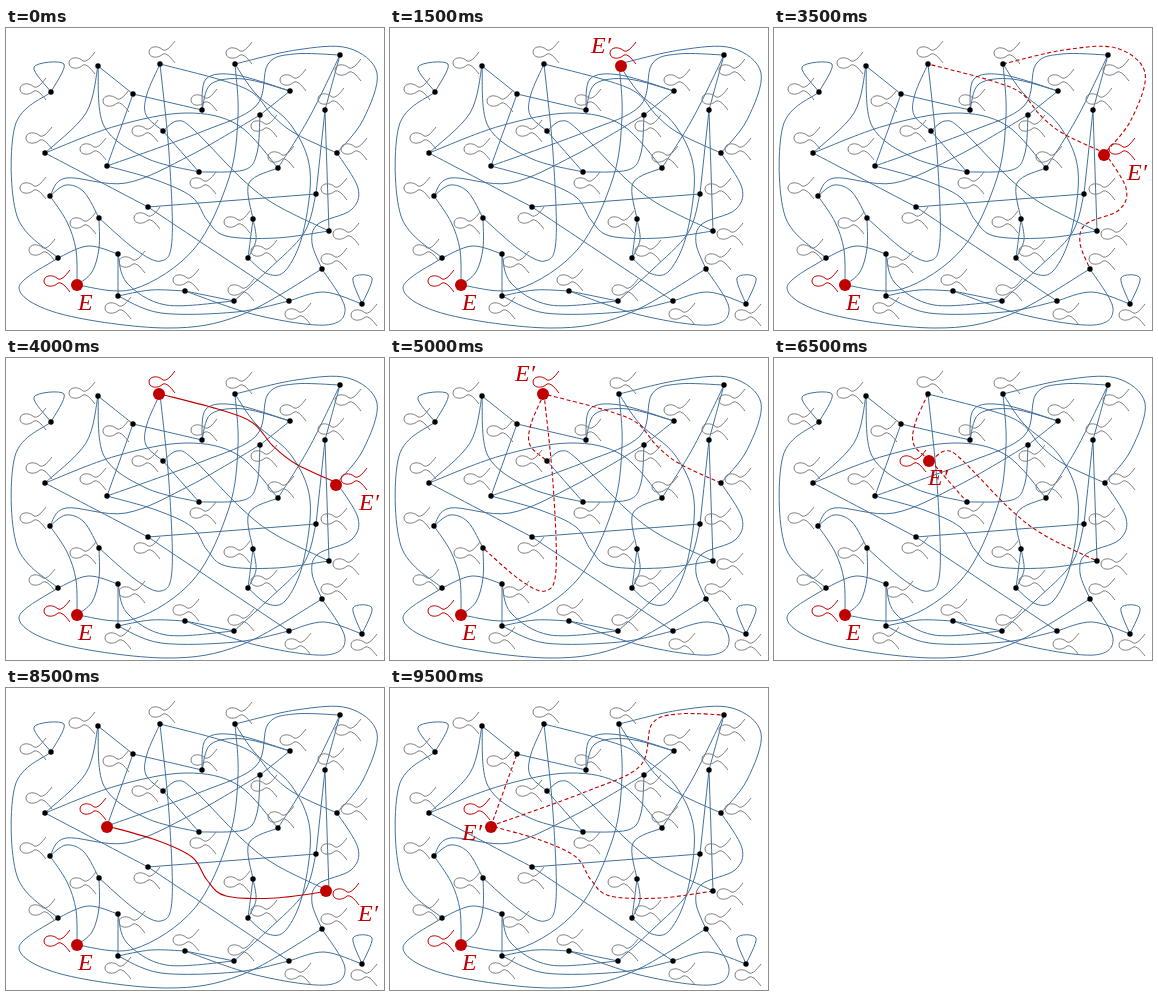
These frames come from a looping animation (378x302 px, 10 s). An HTML page with a canvas:

```html
<!DOCTYPE html>
<html lang="en">
<head>
<meta charset="utf-8">
<title>Random walk on a graph of curves</title>
<style>
html, body { margin: 0; width: 100%; height: 100%; overflow: hidden; background: #fff; }
canvas { display: block; width: 378px; height: 302px; }
</style>
</head>
<body>
<canvas id="stage" width="378" height="302"></canvas>
<script>
const ctx = document.getElementById('stage').getContext('2d');
const RED = '#c00000', BLUE = '#41719c', GRAY = '#7f7f7f';
const STEP = 500, STEPS = 20;

// Vertex: x, y, then the centre of its small curve symbol.
const nodes = {
  A: [45, 64, 27, 61], B: [92, 38, 76, 35], C: [127, 66, 110, 73], D: [154, 36, 156, 24],
  F: [196, 82, 198, 72], G: [229, 36, 233, 25], H: [284, 63, 287, 52], I: [334, 27, 342, 42],
  J: [39, 125, 33, 110], K: [101, 138, 87, 121], L: [157, 103, 139, 103], M: [193, 144, 197, 155],
  N: [254, 87, 258, 98], O: [319, 82, 325, 71], P: [272, 140, 275, 129], Q: [331, 125, 348, 121],
  R: [310, 166, 328, 161], S: [142, 179, 141, 190], T: [44, 168, 27, 160], U: [93, 190, 77, 195],
  V: [247, 191, 231, 194], W: [323, 203, 340, 206], X: [242, 230, 258, 223], Y: [52, 230, 36, 222],
  Z: [112, 226, 126, 234], E: [71, 257, 51, 253], a: [112, 268, 112, 280], b: [179, 263, 180, 252],
  c: [228, 273, 235, 262], d: [283, 273, 292, 286], e: [316, 241, 328, 231], f: [356, 276, 358, 287]
};

// Edges met by the walk, with the points they pass through.
const walkEdges = {
  ET: [70, 222, 61, 194], EU: [86, 244, 93, 220],
  EG: [128, 261, 188, 221, 223, 150, 232, 88],
  GQ: [290, 22, 342, 20, 371, 45, 357, 92],
  GX: [250, 66, 285, 97, 304, 142, 297, 205, 280, 242, 262, 246],
  QD: [290, 106, 267, 88, 247, 65, 215, 52],
  Qe: [352, 160, 345, 182, 312, 196, 306, 215],
  DL: [141, 66, 140, 87], DU: [163, 125, 166, 212, 155, 233, 130, 222],
  LM: [], LW: [171, 93, 187, 101, 236, 151, 270, 177], WO: [],
  WK: [270, 210, 220, 208, 201, 192, 186, 169, 150, 152],
  KC: [], KI: [195, 104, 250, 78, 262, 36, 288, 26]
};

const otherEdges = {
  AY: [9, 98, 11, 188], AA: [28, 39, 58, 36], BC: [], BJ: [80, 85], BM: [98, 98, 140, 130],
  CF: [], FH: [200, 51, 230, 47], HF: [238, 51, 205, 56], HN: [], JS: [],
  JP: [110, 98, 180, 85, 232, 97], MN: [238, 142, 251, 125],
  NT: [185, 127, 120, 155, 60, 150], IP: [303, 90], IO: [], OR: [],
  PV: [243, 155], VX: [], XV: [250, 212], RS: [], Rc: [298, 205, 262, 242],
  Sd: [], TU: [60, 157, 78, 164], YZ: [82, 218], Za: [],
  Ye: [13, 260, 55, 286, 160, 300, 235, 287],
  Zc: [121, 255, 160, 277], ab: [145, 262], ad: [155, 285, 230, 284],
  bc: [], be: [250, 287, 320, 297, 339, 280], df: [318, 264], ff: [347, 250, 366, 250]
};

const walk = [...'EGQDLWK'];
const labels = {
  G: [201, 25], Q: [353, 152], D: [125, 23], L: [154, 127], W: [352, 233], K: [72, 152]
};
// Large dots sit slightly off some vertices.
const nudge = { G: [2, 2], Q: [-1, 2], D: [-1, 0], L: [-2, 0], W: [-3, 0], K: [0, 1] };

const symbol = new Path2D('M13-11Q5 0 1-2C-4-7-13-6-13 0C-13 6-4 7 1 2Q5 0 13 11');

function spline(key, via) {
  const pts = [nodes[key[0]].slice(0, 2)];
  for (let i = 0; i < via.length; i += 2) pts.push([via[i], via[i + 1]]);
  pts.push(nodes[key[1]].slice(0, 2));
  const at = i => pts[Math.max(0, Math.min(pts.length - 1, i))];
  const path = new Path2D();
  path.moveTo(...pts[0]);
  for (let i = 0; i < pts.length - 1; i++) {
    const [p, q, r, s] = [at(i - 1), at(i), at(i + 1), at(i + 2)];
    path.bezierCurveTo(
      q[0] + (r[0] - p[0]) / 6, q[1] + (r[1] - p[1]) / 6,
      r[0] - (s[0] - q[0]) / 6, r[1] - (s[1] - q[1]) / 6, r[0], r[1]);
  }
  return path;
}

const edges = Object.entries({ ...otherEdges, ...walkEdges })
  .map(([key, via]) => ({ key, path: spline(key, via) }));

function dot(x, y, r, color) {
  ctx.fillStyle = color;
  ctx.beginPath();
  ctx.arc(x, y, r, 0, Math.PI * 2);
  ctx.fill();
}

function drawEdge({ key, path }, here, next, phase) {
  const dashed = phase === 1 && key in walkEdges && key.includes(here);
  const taken = phase === 2 && (key === here + next || key === next + here);
  ctx.strokeStyle = dashed || taken ? RED : BLUE;
  ctx.setLineDash(dashed ? [4, 2.5] : []);
  ctx.lineWidth = dashed || taken ? 1.1 : 1;
  ctx.stroke(path);
}

function drawNode(name, red) {
  const [x, y, sx, sy] = nodes[name];
  ctx.save();
  ctx.translate(sx, sy);
  ctx.strokeStyle = red ? RED : GRAY;
  ctx.lineWidth = 1;
  ctx.stroke(symbol);
  ctx.restore();
  const [dx, dy] = red && nudge[name] || [0, 0];
  dot(x + dx, y + dy, red ? 6 : 2.7, red ? RED : '#000');
}

// Each stop has three phases: arrive, show the choices, take one edge.
function draw(step) {
  const stop = Math.floor(step / 3), phase = step % 3;
  const here = walk[stop], next = walk[stop + 1];
  ctx.fillStyle = '#fff';
  ctx.fillRect(0, 0, 378, 302);
  edges.forEach(edge => drawEdge(edge, here, next, phase));
  ctx.setLineDash([]);
  for (const name in nodes) {
    drawNode(name, name === 'E' || name === here || (phase === 2 && name === next));
  }
  ctx.fillStyle = RED;
  ctx.font = 'italic 24px "Liberation Serif", "Times New Roman", serif';
  ctx.fillText('E', 72, 282);
  if (labels[here]) ctx.fillText('E\u2032', ...labels[here]);
}

const start = performance.now();
function tick() {
  draw(Math.floor((performance.now() - start) / STEP) % STEPS);
  requestAnimationFrame(tick);
}
tick();
</script>
</body>
</html>
```
